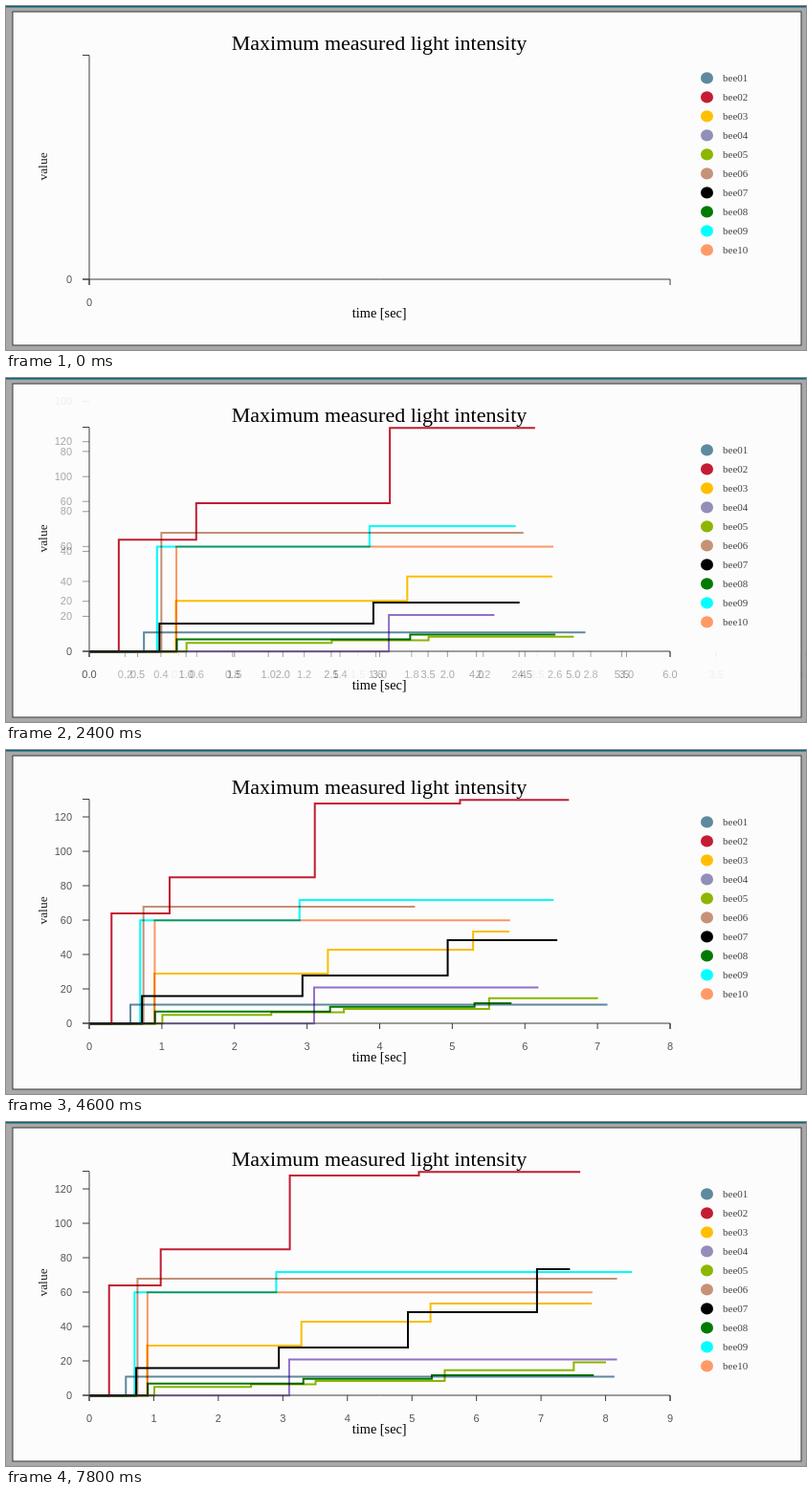
Write an HTML page with a canvas that moves like this. It is 836x360 px and loops after 8000 ms.

```html
<!DOCTYPE html>
<html lang="en">
<head>
<meta charset="utf-8">
<title>Light intensity chart</title>
<style>
  html, body { margin: 0; width: 100%; height: 100%; overflow: hidden; background: #a8a8a8; }
  canvas { display: block; }
</style>
</head>
<body>
<canvas id="stage" width="836" height="360"></canvas>
<script>
const W = 836, H = 360, LOOP = 8000;
const LEFT = 87, RIGHT = 694, TOP = 52, BASE = 286;
const SERIF = '"Liberation Serif", serif';
const SANS = '"Liberation Sans", sans-serif';

// Axis ranges after each data update.
const views = [
  { xMax: 0, xStep: 1, digits: 0, yMax: 0 },
  { xMax: 3, xStep: 0.2, digits: 1, yMax: 85 },
  { xMax: 6, xStep: 0.5, digits: 1, yMax: 128 },
  { xMax: 8, xStep: 1, digits: 0, yMax: 130 },
  { xMax: 9, xStep: 1, digits: 0, yMax: 130 }
];

// steps: [second, new value]; ends: last second drawn in each view.
const series = [
  { color: '#5d8a9e', steps: [[0.56, 11]], ends: [2.12, 5.12, 7.13, 8.13] },
  { color: '#c41c32', steps: [[0.3, 64], [1.1, 85], [3.1, 128], [5.1, 130]], ends: [2.6, 4.6, 6.6, 7.6] },
  { color: '#ffbf00', steps: [[0.89, 29], [3.28, 43], [5.28, 53.5]], ends: [2.78, 4.78, 5.78, 7.78] },
  { color: '#9470cc', dot: '#928eba', steps: [[3.09, 21]], ends: [2, 4.18, 6.18, 8.17] },
  { color: '#8db600', steps: [[1, 5], [2.5, 6.5], [3.5, 8.5], [5.5, 14.7], [7.5, 19.3]], ends: [2, 5, 7, 8] },
  { color: '#c69277', steps: [[0.74, 68]], ends: [2.48, 4.48, 4.48, 8.17] },
  { color: '#000000', steps: [[0.72, 16], [2.93, 28], [4.93, 48.5], [6.93, 73.5]], ends: [2.44, 4.44, 6.44, 7.44] },
  { color: '#007a00', steps: [[0.9, 7], [3.31, 9.7], [5.3, 11.8]], ends: [2.81, 4.81, 5.81, 7.81] },
  { color: '#00ffff', steps: [[0.695, 60], [2.89, 71.8]], ends: [2.39, 4.4, 6.39, 8.4] },
  { color: '#ff9966', steps: [[0.895, 60]], ends: [2.79, 4.79, 5.79, 7.79] }
];

// [time, pictures mixed evenly]; a fraction is the axis progress to the next view.
const cues = [
  [0, [0]], [400, [0, 1]], [600, [1]],
  [2200, [1, 1.15]], [2400, [1.15, 2]], [2600, [2]],
  [4400, [2, 3]], [4600, [3]],
  [6400, [3, 3.13]], [6600, [3.13, 4]], [6800, [4]]
];

const lerp = (a, b, p) => a + (b - a) * p;
const part = (v, max) => max ? v / max : 0;
const xAt = (v, view) => LEFT + part(v, view.xMax) * (RIGHT - LEFT);
const yAt = (v, view) => BASE - part(v, view.yMax) * (BASE - TOP);

function makeCanvas() {
  const c = document.createElement('canvas');
  c.width = W;
  c.height = H;
  return c;
}

function text(g, str, x, y, font, align, color) {
  g.font = font;
  g.textAlign = align;
  g.fillStyle = color;
  g.fillText(str, x, y);
}

function polyline(g, points) {
  g.beginPath();
  points.forEach(([x, y]) => g.lineTo(x, y));
  g.stroke();
}

function drawPanel(g) {
  g.fillStyle = '#a8a8a8';
  g.fillRect(0, 0, W, H);
  g.fillStyle = '#0b6478';
  g.fillRect(0, 0, W, 1.5);
  g.fillStyle = '#fcfcfc';
  g.fillRect(7, 6, 824, 349);
  g.strokeStyle = '#383838';
  g.lineWidth = 1;
  g.strokeRect(7, 6, 824, 349);
}

function drawLines(g, index) {
  if (!index) return;
  const view = views[index];
  g.save();
  g.translate(0.5, 0.3);
  g.globalCompositeOperation = 'multiply';
  g.lineWidth = 2;
  for (const { color, steps, ends } of series) {
    const end = ends[index - 1];
    const points = [];
    let value = 0;
    const add = t => points.push([xAt(t, view), yAt(value, view)]);
    add(0);
    for (const [t, next] of steps) {
      if (t > end) break;
      add(t);
      value = next;
      add(t);
    }
    add(end);
    g.strokeStyle = color;
    polyline(g, points);
  }
  g.restore();
}

function tickValues(max, step) {
  const list = [];
  for (let i = 0; i * step <= max + 1e-6; i++) list.push(+(i * step).toFixed(1));
  return list;
}

// Ticks move between two scales while new ones fade in and old ones fade out.
function eachTick(before, after, p, draw) {
  for (const v of new Set([...before, ...after])) {
    const isOld = before.includes(v), isNew = after.includes(v);
    draw(v, isOld && isNew ? 1 : isNew ? p : 1 - p, isNew);
  }
}

function drawAxes(g, a, b, p) {
  g.strokeStyle = '#3c3c3c';
  g.lineWidth = 1;
  polyline(g, [[80, TOP - 0.5], [LEFT, TOP - 0.5], [LEFT, BASE], [80, BASE]]);
  polyline(g, [[LEFT, BASE + 6], [LEFT, BASE], [RIGHT, BASE], [RIGHT, BASE + 6]]);

  eachTick(tickValues(a.xMax, a.xStep), tickValues(b.xMax, b.xStep), p, (v, alpha, isNew) => {
    const x = lerp(xAt(v, a), xAt(v, b), p);
    g.globalAlpha = alpha;
    polyline(g, [[x, BASE], [x, BASE + 6]]);
    text(g, v.toFixed((isNew ? b : a).digits), x, 314, '11px ' + SANS, 'center', '#555');
  });
  eachTick(tickValues(a.yMax, 20), tickValues(b.yMax, 20), p, (v, alpha) => {
    const y = lerp(yAt(v, a), yAt(v, b), p);
    g.globalAlpha = alpha;
    polyline(g, [[80, y], [LEFT, y]]);
    text(g, String(v), 69, y + 3.7, '11px ' + SANS, 'right', '#555');
  });
  g.globalAlpha = 1;
}

function drawLabels(g) {
  text(g, 'Maximum measured light intensity', 390, 46, '22px ' + SERIF, 'center', '#000');
  text(g, 'time [sec]', 390.2, 325.7, '14.3px ' + SERIF, 'center', '#000');
  g.save();
  g.translate(43, 168);
  g.rotate(-Math.PI / 2);
  text(g, 'value', 0, 0, '13.5px ' + SERIF, 'center', '#222');
  g.restore();
  series.forEach(({ color, dot = color }, i) => {
    const y = 75 + i * 20;
    g.fillStyle = dot;
    g.beginPath();
    g.ellipse(732.5, y + 0.4, 6.5, 6.1, 0, 0, Math.PI * 2);
    g.fill();
    text(g, 'bee' + String(i + 1).padStart(2, '0'), 749, y + 3.5, '11px ' + SERIF, 'left', '#444');
  });
}

const pictures = new Map();
function picture(id) {
  if (!pictures.has(id)) {
    const c = makeCanvas(), g = c.getContext('2d');
    const from = Math.floor(id), to = Math.ceil(id);
    drawPanel(g);
    drawLines(g, to);
    drawAxes(g, views[from], views[to], id - from);
    drawLabels(g);
    pictures.set(id, c);
  }
  return pictures.get(id);
}

const stage = document.getElementById('stage').getContext('2d');
const start = performance.now();

function render() {
  const t = Math.max(0, performance.now() - start) % LOOP;
  const [, mix] = cues.filter(([at]) => at <= t).pop();
  mix.forEach((id, i) => {
    stage.globalAlpha = 1 / (i + 1);
    stage.drawImage(picture(id), 0, 0);
  });
  requestAnimationFrame(render);
}
render();
</script>
</body>
</html>
```
